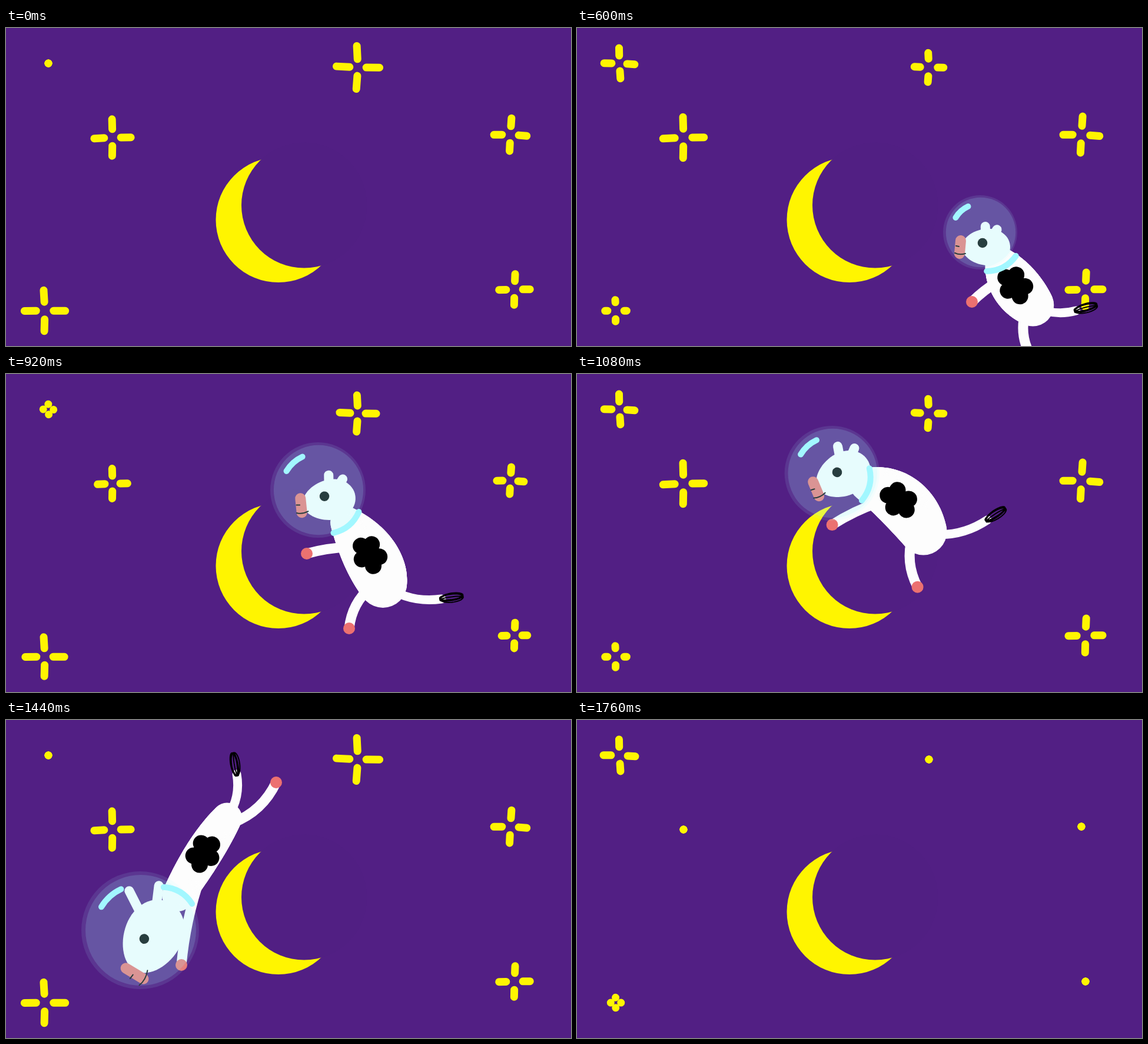
Animation, 960 px wide and 540 px high, one loop 1.8 s. Source, as an HTML page with a canvas:

```html
<!DOCTYPE html>
<html lang="en">
<head>
<meta charset="utf-8">
<title>Cow over the moon</title>
<style>
  html, body { margin: 0; width: 100%; height: 100%; overflow: hidden; background: #521f84; }
  canvas { display: block; }
</style>
</head>
<body>
<canvas id="stage" width="960" height="540"></canvas>
<script>
const ctx = document.getElementById('stage').getContext('2d');
const { PI, sin, cos, max, min, floor, hypot, atan2 } = Math;
const STEP = 40, STEPS = 45, TWINKLE = 12;
const NIGHT = '#521f84', SHADE = '#511f83', YELLOW = '#fff500';
const WHITE = '#fdfdfd', PINK = '#ec7170', GLASS = '#a2f7ff', BLACK = '#000';
const rad = deg => deg * PI / 180;
const random = seed => { const v = sin(seed * 12.9898) * 43758.5453; return v - floor(v); };

function disc(x, y, r, color, alpha = 1) {
  ctx.globalAlpha = alpha;
  ctx.fillStyle = color;
  ctx.beginPath();
  ctx.arc(x, y, r, 0, 2 * PI);
  ctx.fill();
  ctx.globalAlpha = 1;
}

function stroke(width, color, x0, y0, cx, cy, x1, y1) {
  ctx.lineWidth = width;
  ctx.strokeStyle = color;
  ctx.beginPath();
  ctx.moveTo(x0, y0);
  ctx.quadraticCurveTo(cx, cy, x1, y1);
  ctx.stroke();
}

const line = (width, color, x0, y0, x1, y1) => stroke(width, color, x0, y0, x0, y0, x1, y1);

// Draws in a moved, turned and scaled frame.
function within(x, y, angle, scale, paint) {
  ctx.save();
  ctx.translate(x, y);
  ctx.rotate(angle);
  ctx.scale(scale, scale);
  paint();
  ctx.restore();
}

// A star opens from a dot: four dots drift out, grow into arms, shrink and close.
const stars = [
  { x: 72, y: 60, born: 0, size: 20, fade: 10 },
  { x: 181, y: 186, born: 8, size: 21, fade: 11 },
  { x: 598, y: 67, born: 8, size: 23, fade: 8 },
  { x: 857, y: 181, born: 8, size: 17, fade: 11 },
  { x: 864, y: 444, born: 8, size: 15, fade: 11 },
  { x: 66, y: 480, born: 7, size: 20, fade: 8.5 }
];

function drawStar(star, step, index) {
  const age = (step - star.born + TWINKLE) % TWINKLE;
  const gap = 15 * sin(PI * age / TWINKLE) ** 0.4;
  const growth = min(max((age - 1) / (star.fade - 1), 0), 1);
  const reach = gap + star.size * sin(PI * growth) + 0.01;
  for (let arm = 0; arm < 4; arm++) {
    const a = arm * PI / 2 + 0.16 * (random(index * 4 + arm + 1) - 0.5);
    line(13, YELLOW, star.x + gap * cos(a), star.y + gap * sin(a), star.x + reach * cos(a), star.y + reach * sin(a));
  }
}

// Key poses of the leap. head: x, y, turn, scale, turn of the ears; helmet: x, y, radius;
// spine: neck, bend, rump; the rest are end points.
const poses = [
  { at: 9, head: [743, 462, 0, 1.05, -10], helmet: [740, 452, 61], spine: [743, 500, 750, 540, 762, 580],
    fat: [38], hand: [658, 483], foot: [735, 665], tail: [850, 600] },
  { at: 15, head: [695, 372, 0, 1, -75], helmet: [685, 347, 63], spine: [721, 400, 742, 440, 776, 472],
    fat: [35], hand: [671, 465], foot: [770, 555], tail: [848, 480] },
  { at: 23, head: [549, 214, -11, 1.1, -74], helmet: [530, 197, 81], spine: [578, 252, 628, 312, 641, 358],
    fat: [40], hand: [511, 305], foot: [583, 432], tail: [740, 382] },
  { at: 31, head: [352, 176, -47, 1.3, -95], helmet: [334, 185, 81], spine: [399, 160, 476, 120, 529, 188],
    fat: [36], hand: [362, 251], foot: [579, 276], tail: [628, 115] },
  { at: 36, head: [249, 368, -64, 1.58, -100], helmet: [228, 357, 100], spine: [292, 298, 340, 216, 377, 164],
    fat: [25], hand: [298, 416], foot: [459, 106], tail: [392, 92] }
];
const first = poses[0].at, last = poses[poses.length - 1].at;

// Smooth interpolation of one part through the key poses.
function tween(part, t) {
  let i = 0;
  while (i < poses.length - 2 && t >= poses[i + 1].at) i++;
  const span = poses[i + 1].at - poses[i].at, u = (t - poses[i].at) / span;
  const ease = u * u * (3 - 2 * u);
  const slope = (k, n) => {
    const a = poses[max(k - 1, 0)], b = poses[min(k + 1, poses.length - 1)];
    return (b[part][n] - a[part][n]) / (b.at - a.at) * span;
  };
  return poses[i][part].map((v, n) =>
    v + (poses[i + 1][part][n] - v) * ease +
    slope(i, n) * u * (1 - u) ** 2 - slope(i + 1, n) * u * u * (1 - u));
}

// Point, direction and thickness along the bent spine.
function along([x0, y0, x1, y1, x2, y2], fat, u) {
  const mix = (a, b, c) => a * (1 - u) ** 2 + 2 * b * u * (1 - u) + c * u * u;
  const dx = (x1 - x0) * (1 - u) + (x2 - x1) * u, dy = (y1 - y0) * (1 - u) + (y2 - y1) * u;
  const d = hypot(dx, dy);
  return { x: mix(x0, x1, x2), y: mix(y0, y1, y2), r: mix(27, 1.5 * fat, fat), tx: dx / d, ty: dy / d };
}

// A bowed limb from a point on the belly side of the spine.
function limb(root, side, [x, y], width, bow) {
  const x0 = root.x - root.ty * root.r * side, y0 = root.y + root.tx * root.r * side;
  const cx = (x0 + x) / 2 - (y - y0) * bow, cy = (y0 + y) / 2 + (x - x0) * bow;
  stroke(width, WHITE, x0, y0, cx, cy, x, y);
  return atan2(y - cy, x - cx);
}

function drawTuft(x, y, angle) {
  within(x, y, angle, 1, () => {
    ctx.lineWidth = 2;
    ctx.strokeStyle = BLACK;
    ctx.beginPath();
    for (let a = 0; a < 8 * PI; a += 0.2) {
      const wide = 2 + a / 4;
      ctx.lineTo(17 - 20 * cos(a), wide * sin(a) + 2 * sin(a / 3));
    }
    ctx.stroke();
  });
}

function drawSpot({ x, y, tx, ty }) {
  within(x, y, atan2(ty, tx), 1, () => {
    disc(0, 0, 19, BLACK);
    for (let i = 0; i < 5; i++) {
      const a = i * 2 * PI / 5 + 0.3;
      disc(21 * cos(a), 15 * sin(a), 14, BLACK);
    }
  });
}

function drawHead([x, y, turn, scale, earTurn]) {
  const ear = 35 * scale * scale;
  for (const side of [-17, 17]) {
    const a = rad(earTurn + side);
    line(16, WHITE, x + 0.5 * ear * cos(a), y + 0.5 * ear * sin(a), x + ear * cos(a), y + ear * sin(a));
  }
  within(x, y, rad(turn), scale, () => {
    // an egg, narrower towards the snout
    ctx.fillStyle = WHITE;
    ctx.beginPath();
    for (let a = 0; a < 2 * PI; a += 0.1) ctx.lineTo(41 * cos(a), (31 + 3 * cos(a)) * sin(a));
    ctx.fill();
    line(18 / scale, PINK, -43, -11, -45, 11);
    line(2 / scale, BLACK, -51, -2, -46, -1);
    stroke(2 / scale, BLACK, -53, 10, -45, 14, -35, 11);
    disc(-6, -7, 8.3 / scale, BLACK);
  });
}

function drawHelmet([x, y, r]) {
  disc(x, y, r, GLASS, 0.1);
  disc(x + 1, y, r * 0.94, GLASS, 0.16);
  ctx.lineWidth = 10;
  ctx.strokeStyle = GLASS;
  ctx.beginPath();
  ctx.arc(x, y, r * 0.77, rad(211), rad(245));
  ctx.stroke();
}

function drawCollar({ x, y, tx, ty }) {
  const px = -ty * 28, py = tx * 28;
  stroke(10, GLASS, x + px, y + py, x + tx * 14, y + ty * 14, x - px, y - py);
}

function drawCow(step) {
  const t = min(max(step, first), last);
  const [fat] = tween('fat', t), spine = tween('spine', t);
  const part = u => along(spine, fat, u);
  const hand = tween('hand', t), foot = tween('foot', t), tail = tween('tail', t);
  const early = first - min(step, first), late = max(step, last) - last;

  ctx.save();
  // steady climb into view, accelerating fall out of it
  ctx.translate(7.5 * early - 7 * late, 26 * early + late * (50 + 5 * late));
  drawTuft(...tail, limb(part(1), 0, tail, 15, 0.2));
  limb(part(0.97), 0.5, foot, 17, 0.2);
  limb(part(0.25), 0.55, hand, 17, 0.06);
  disc(...foot, 10, PINK);
  disc(...hand, 10, PINK);
  for (let u = 0; u <= 1; u += 0.02) {
    const p = part(u);
    disc(p.x, p.y, p.r, WHITE);
  }
  drawSpot(part(0.48));
  drawHead(tween('head', t));
  drawHelmet(tween('helmet', t));
  drawCollar(part(0));
  ctx.restore();
}

function draw(step) {
  ctx.fillStyle = NIGHT;
  ctx.fillRect(0, 0, 960, 540);
  disc(462.8, 325.8, 106.3, YELLOW);
  disc(506.6, 301, 106.6, SHADE);
  stars.forEach((star, i) => drawStar(star, step, i));
  drawCow(step);
}

ctx.lineCap = ctx.lineJoin = 'round';
const start = performance.now();
function tick() {
  draw(floor((performance.now() - start) / STEP) % STEPS);
  requestAnimationFrame(tick);
}
tick();
</script>
</body>
</html>
```
